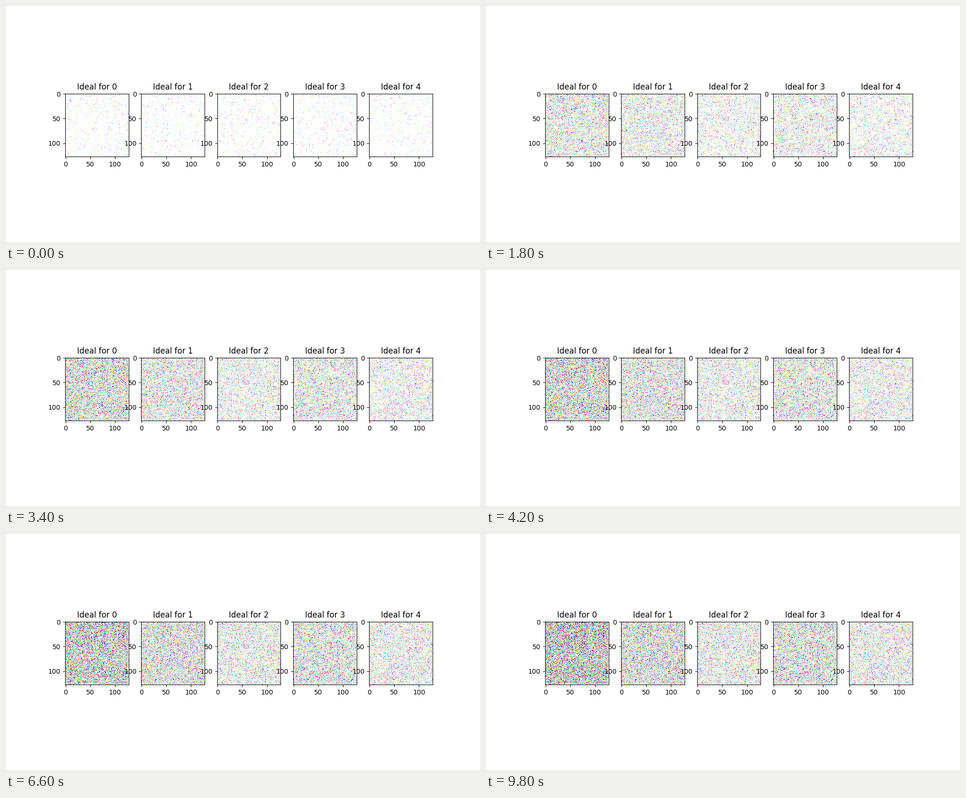
Animation, 1000 px wide and 500 px high, one loop 10000 ms. Source, as a matplotlib script:

```python
import numpy as np
import matplotlib.pyplot as plt
from matplotlib.animation import FuncAnimation

SIZE = 128
FRAMES = 50
INTERVAL = 200  # ms
START = 0.008  # dark share of channel values at the start of the loop
FINAL_GAINS = (0.25, 0.15, 0.085, 0.135, 0.078)


def make_thresholds(seed):
    """Share at which each channel of each pixel turns dark."""
    rng = np.random.default_rng(seed)
    field = rng.random((SIZE, SIZE, 3))
    # the far edges fill in more sparsely
    field[-2:] *= 2.5
    field[:, -2:] *= 2.5
    return field


def dark_share(gain, seconds):
    """Saturating growth; denser panels take longer to settle."""
    tau = 2 + 8 * gain
    return START + gain * (1 - np.exp(-seconds / tau))


class NoisePanel:
    def __init__(self, ax, index, gain):
        self.gain = gain
        self.thresholds = make_thresholds(40 + index)
        self.image = ax.imshow(self.pixels(0), interpolation="nearest")
        ax.set_title(f"Ideal for {index}")

    def pixels(self, frame):
        share = dark_share(self.gain, frame * INTERVAL / 1000)
        return (self.thresholds >= share).astype(float)

    def show(self, frame):
        self.image.set_data(self.pixels(frame))
        return self.image


fig, axes = plt.subplots(1, len(FINAL_GAINS), figsize=(10, 5), dpi=100)
panels = [NoisePanel(ax, k, gain)
          for k, (ax, gain) in enumerate(zip(axes, FINAL_GAINS))]


def update(frame):
    return [panel.show(frame) for panel in panels]


anim = FuncAnimation(fig, update, frames=FRAMES, interval=INTERVAL,
                     repeat=True, repeat_delay=0, blit=False)
plt.show()
```
